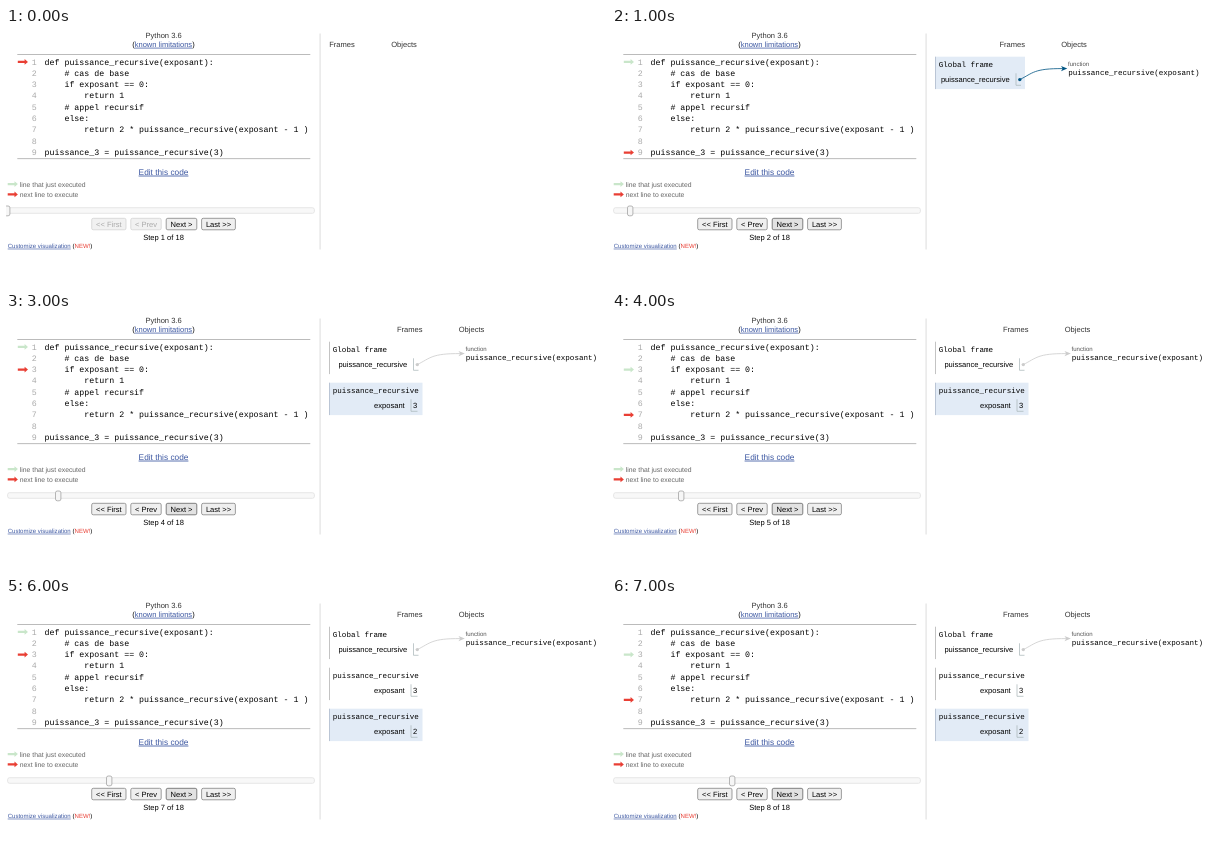
Recreate the animation shown at these times as an HTML page. Size 600 px wide and 257 px high, loop 8000 ms.

```html
<!DOCTYPE html>
<html lang="fr">
<head>
<meta charset="utf-8">
<title>Recursion step by step</title>
<style>
html, body { margin: 0; width: 100%; height: 100%; overflow: hidden; background: #fff; }
svg { display: block; width: 100%; height: 100%; }
text { font: 7.55px "Liberation Sans", Arial, sans-serif; white-space: pre; text-rendering: geometricPrecision; }
.mono { font-family: "Liberation Mono", "Courier New", monospace; }
.code { font-size: 8.3px; }
.edit { font-size: 8.3px; }
.legend { font-size: 6.8px; fill: #666; }
.small { font-size: 6.04px; }
.link { fill: #3d58a2; text-decoration: underline .6px; }
.num { fill: #aaa; }
.mid { text-anchor: middle; }
.end { text-anchor: end; }
</style>
</head>
<body>
<svg id="stage" viewBox="0 0 600 257"></svg>
<script>
const STEP_MS = 1000;
const PREV = "#c9e6ca", NEXT = "#e93f34";
const CODE = [
  "def puissance_recursive(exposant):",
  "    # cas de base",
  "    if exposant == 0:",
  "        return 1",
  "    # appel recursif",
  "    else:",
  "        return 2 * puissance_recursive(exposant - 1 )",
  "",
  "puissance_3 = puissance_recursive(3)"
];
// [line just run, next line, arguments of the open calls]
const STEPS = [
  [0, 1, []],
  [1, 9, []],
  [9, 1, [3]],
  [1, 3, [3]],
  [3, 7, [3]],
  [7, 1, [3, 2]],
  [1, 3, [3, 2]],
  [3, 7, [3, 2]]
];

const esc = s => s.replace(/&/g, "&amp;").replace(/</g, "&lt;").replace(/>/g, "&gt;");
const text = (x, y, s, cls = "", fill = "") =>
  `<text x="${x}" y="${y}" class="${cls}"${fill && ` fill="${fill}"`}>${esc(s)}</text>`;
const rect = (x, y, w, h, fill, extra = "") =>
  `<rect x="${x}" y="${y}" width="${w}" height="${h}" fill="${fill}" ${extra}/>`;
const box = (x, y, w, h, fill, stroke, r) =>
  rect(x, y, w, h, fill, `stroke="${stroke}" stroke-width=".7" rx="${r}"`);
const arrow = (x, y, fill) =>
  `<polygon transform="translate(${x} ${y}) scale(.566)" points="0,-2 12,-2 12,-5 18,0 12,5 12,2 0,2" fill="${fill}"/>`;
const lineY = n => 36.5 + (n - 1) * 11.33;

function fixedParts() {
  let s = text(157.6, 10.2, "Python 3.6", "mid", "#333");
  s += `<text x="157.4" y="18.7" class="mid">(<tspan class="link">known limitations</tspan>)</text>`;
  s += rect(11.3, 26, 293, .8, "#aaa") + rect(11.3, 130.3, 293, .8, "#aaa");
  CODE.forEach((line, i) => {
    s += text(30.7, lineY(i + 1), String(i + 1), "mono code num end");
    s += text(38.5, lineY(i + 1), line, "mono code");
  });
  s += text(157.5, 146.6, "Edit this code", "mid edit link");
  s += arrow(1.7, 156.1, PREV) + text(13.8, 158.8, "line that just executed", "legend");
  s += arrow(1.7, 166.4, NEXT) + text(13.8, 169.1, "next line to execute", "legend");
  s += box(1.6, 179.7, 306.8, 5.6, "#f8f8f8", "#ddd", 2);
  s += text(1.7, 219.7, "Customize visualization", "small link");
  s += `<text x="66.6" y="219.7" class="small">(<tspan fill="${NEXT}">NEW!</tspan>)</text>`;
  s += rect(313.7, 5.5, .7, 216, "#ccc");
  return s;
}

function button(x, w, label, state) {
  const [fill, stroke, ink] = {
    off: ["#f1f1f1", "#cfcfcf", "#aaa"],
    on: ["#efefef", "#767676", "#000"],
    hover: ["#e2e2e2", "#4f4f4f", "#000"]
  }[state];
  return box(x, 190.3, w, 11.5, fill, stroke, 1.6) + text(x + w / 2, 198.7, label, "mid", ink);
}

function frame(i, right, title, name, value, active) {
  const y = 28.7 + i * 41;
  const cell = right - (i ? 11.5 : 9);
  let s = active ? rect(323.2, y, right - 323.2, 32.4, "#e2ebf6") : "";
  s += rect(323.2, y, .7, 32.4, active ? "#a6b3c6" : "#aaa");
  s += text(326.8, y + 10.2, title, "mono");
  s += text(cell - 6.3, y + 25.2, name, "end");
  s += `<path d="M${cell} ${y + 16.6}v12h${i ? 6.5 : 5}" fill="none" stroke="#a6b3b6" stroke-width=".7"/>`;
  return s + text(cell + 2.1, y + 25.4, value);
}

function pointer(dx, color) {
  return `<g transform="translate(${dx} 0)" fill="${color}">
    <circle cx="407.8" cy="51.6" r="1.7"/>
    <path d="M407.8 51.6C421 45 422 40.4 451 40.6" fill="none" stroke="${color}" stroke-width=".8"/>
    <path d="M455.3 40.6L449 37.9L450.7 40.6L449 43.3Z"/></g>`;
}

function memory(k, args) {
  if (!k) return text(323.2, 18.8, "Frames", "", "#333") + text(385.2, 18.8, "Objects", "", "#333");
  const dx = args.length ? 3.5 : 0;
  const right = 413 + dx;
  let s = text(right, 18.8, "Frames", "end", "#333") + text(449.2 + dx, 18.8, "Objects", "", "#333");
  s += frame(0, right, "Global frame", "puissance_recursive", "", !dx);
  args.forEach((v, i) => {
    s += frame(i + 1, right, "puissance_recursive", "exposant", String(v), i === args.length - 1);
  });
  s += text(456 + dx, 38, "function", "small", "#555");
  s += text(456.2 + dx, 46.8, "puissance_recursive(exposant)", "mono");
  return s + pointer(dx, dx ? "#ccc" : "#005583");
}

function view(k) {
  const [last, next, args] = STEPS[k];
  const back = k ? "on" : "off";
  let s = last ? arrow(11.8, lineY(last) - 2.6, PREV) : "";
  s += arrow(11.8, lineY(next) - 2.6, NEXT);
  s += box(-1.5 + k * 17, 178, 5.4, 9.8, "#f6f6f6", "#999", 1.8);
  s += button(85.7, 34.3, "<< First", back) + button(124.8, 30.4, "< Prev", back);
  s += button(160.2, 30.6, "Next >", k ? "hover" : "on") + button(195.6, 33.8, "Last >>", "on");
  s += text(157.5, 212.4, `Step ${k + 1} of 18`, "mid");
  return s + memory(k, args);
}

const stage = document.getElementById("stage");
stage.innerHTML = `<g>${fixedParts()}</g><g id="live"></g>`;
const live = document.getElementById("live");
let shown = -1;

function show(ms) {
  const k = Math.floor(ms / STEP_MS) % STEPS.length;
  if (k !== shown) live.innerHTML = view(shown = k);
}

let start;
function tick(now) {
  start ??= now;
  show(Math.max(0, now - start));
  requestAnimationFrame(tick);
}
show(0);
requestAnimationFrame(tick);
</script>
</body>
</html>
```
